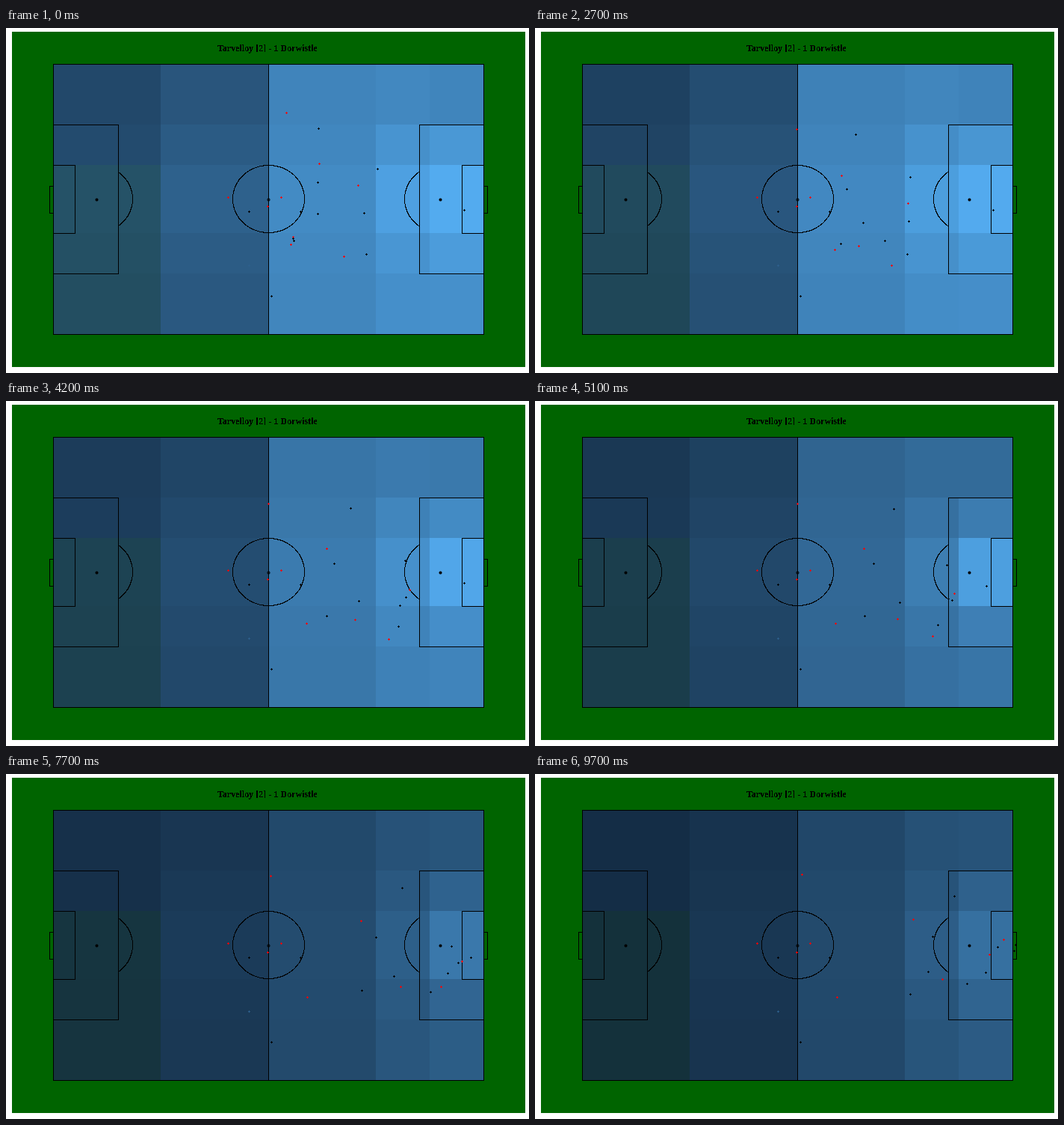
Recreate the animation shown at these times as a matplotlib script. Size 700 by 461 pixels, loop 10000 ms.

```python
import numpy as np
import matplotlib.pyplot as plt
from matplotlib.animation import FuncAnimation
from matplotlib.colors import LinearSegmentedColormap
from matplotlib.markers import MarkerStyle
from matplotlib.patches import Rectangle

W, H, DPI = 700, 461, 100
FRAMES, STEP = 100, 100
PX = 72 / DPI
END = 9.7
SNAP = 0.2  # keeps pixel snapping away from rounding ties

plt.rcParams["toolbar"] = "None"
fig = plt.figure(figsize=(W / DPI, H / DPI), dpi=DPI, facecolor="white")
ax = fig.add_axes([0, 0, 1, 1])
ax.set_xlim(0, W)
ax.set_ylim(H, 0)
ax.axis("off")


def rect(x0, y0, x1, y1, color):
    patch = Rectangle((x0, y0), x1 - x0, y1 - y0, fc=color, ec="none", lw=0, aa=False)
    return ax.add_patch(patch)


def line(xs, ys):
    ax.plot(np.add(xs, SNAP), np.add(ys, SNAP), color="black", lw=PX, aa=False, zorder=3)


def box(x0, y0, x1, y1):
    line([x0, x1, x1, x0, x0], [y0, y0, y1, y1, y0])


def arc(cx, a0, a1):
    a = np.linspace(a0, a1, 600)
    pts = np.round(np.column_stack([cx + 48 * np.cos(a), 229 + 45 * np.sin(a)]))
    x, y = np.unique(pts, axis=0).T + SNAP
    ax.plot(x, y, ",", color="black", zorder=3)


# Heat map: one value per zone, fading along an S-curve
HEAT = LinearSegmentedColormap.from_list("heat", ["#132b43", "#336a98", "#56b1f7"])
TEAL = np.array([0, 4, -11]) / 255
XS = (63, 207, 351, 495, 567, 640)
YS = (48, 129, 183, 274, 328, 410)
CENTRAL = (0, 0.5, 1, 0.6, 0.3)
FIRST = ((0.23, 0.05), (0.336, 0.09), (0.68, 0.05), (0.71, 0.17), (0.69, 0.265))
LAST = ((0.02, 0), (0.065, 0.03), (0.225, 0.02), (0.30, 0.10), (0.32, 0.22))


def fade(t, mid, width):
    s = 1 / (1 + np.exp((mid - np.array([0, t, END])) / width))
    return (s[1] - s[0]) / (s[2] - s[0])


def heat(col, row, t):
    if col < 2:
        f = fade(t, 4.3, 1.9)
    elif (col, row) == (4, 2):
        f = fade(t, 6.3, 0.85)
    else:
        f = fade(t, 5.1, 0.75)
    a, b = (base + gain * CENTRAL[row] for base, gain in (FIRST[col], LAST[col]))
    return a + (b - a) * f


rect(8, 5, 695, 453, "#006400")
cells = [(rect(XS[i], YS[j], XS[i + 1], YS[j + 1], "black"), i, j, 0)
         for i in range(5) for j in range(5)]
cells += [(rect(553, YS[j], 567, YS[j + 1], "black"), 3, j, -0.03) for j in (1, 3)]

# Pitch markings
box(63, 48, 639, 409)
line([351, 351], [48, 409])
for x, s in ((63, 1), (639, -1)):
    box(x, 129, x + 86.5 * s, 328)
    box(x, 183, x + 29 * s, 274)
    box(x, 211, x - 5 * s, 247)
arc(351, 0, 2 * np.pi)
arc(121, -0.922, 0.922)
arc(581, np.pi - 0.922, np.pi + 0.922)
for x in (121, 581):
    ax.plot(x + SNAP, 229 + SNAP, "o", color="black", ms=4 * PX, mew=0, zorder=3)
ax.plot(351 + SNAP, 229 + SNAP, "o", mfc="none", mec="black", ms=3 * PX, mew=PX, zorder=3)

ax.text(350, 31, "Tarvelloy [2] - 1 Dorwistle", ha="center", va="baseline",
        family="Liberation Serif", weight="bold", size=12 * PX,
        color="black", antialiased=False)

# Players drop back to a turning point, then run forward on a bowed, eased path
runners = {"red": [], "black": [], "#2d5f8c": []}


def run(color, start, turn, end, ease=1.0, bow=0, t0=0, t1=1.7):
    start, turn, end = (np.array(p, float) for p in (start, turn, end))

    def at(t):
        if t < t1:
            return start + (turn - start) * max(0, (t - t0) / (t1 - t0))
        u = (t - t1) / (END - t1)
        p = np.array([1 - (1 - u) ** ease, u])
        return turn + (end - turn) * p + [0, 4 * bow * u * (1 - u)]

    runners[color].append(at)


def stand(color, *spots):
    for spot in spots:
        run(color, spot, spot, spot)


stand("red", (297, 226), (368, 226), (350, 238))
stand("black", (325, 245), (394, 245), (355, 358))
stand("#2d5f8c", (325, 317))

run("red", (375, 113), (349, 134), (357, 134), 0.6, 3)
run("red", (419, 181), (398, 196), (506, 194), 0.9, 2)
run("red", (471, 210), (468, 216), (627, 221), 1.6, 40)
run("red", (384, 279), (408, 289), (545, 274), 1.5, 9)
run("red", (381, 289), (401, 296), (404, 298))
run("red", (452, 305), (452, 311), (608, 241), 1.3, 34)

run("black", (418, 134), (407, 142), (561, 163), 1.15, -7)
run("black", (497, 188), (480, 187), (619, 231), 1.3, 14)
run("black", (417, 206), (402, 214), (532, 217), 0.9, 2)
run("black", (479, 247), (474, 255), (603, 265), 1.7, 5)
run("black", (417, 248), (412, 254), (526, 264), 2, 11)
run("black", (385, 284), (396, 290), (502, 294), 1, -5)
run("black", (482, 302), (477, 302), (578, 280), 1.7, 7)
# Goalkeeper, then ball
run("black", (613, 243), (588, 255), (641, 236), 0.7, 5, t0=4.5, t1=6.2)
run("black", (384, 281), (424, 291), (643, 228), 1.7, 2)

plus = MarkerStyle("+", capstyle="projecting")
dots = {c: ax.plot([], [], marker=plus, ls="", color=c, ms=2 * PX, mew=PX, zorder=4)[0]
        for c in runners}


def update(k):
    t = min(k * STEP / 1000, END)
    for patch, col, row, shift in cells:
        rgb = np.array(HEAT(heat(col, row, t) + shift)[:3])
        if col == 0 and row > 1:
            rgb = np.clip(rgb + TEAL, 0, 1)
        patch.set_facecolor(rgb)
    for color, group in runners.items():
        xy = np.round([at(t) for at in group]) + SNAP
        dots[color].set_data(xy[:, 0], xy[:, 1])
    return [c[0] for c in cells] + list(dots.values())


anim = FuncAnimation(fig, update, frames=FRAMES, interval=STEP, repeat=True,
                     repeat_delay=0, blit=False)
plt.show()
```
